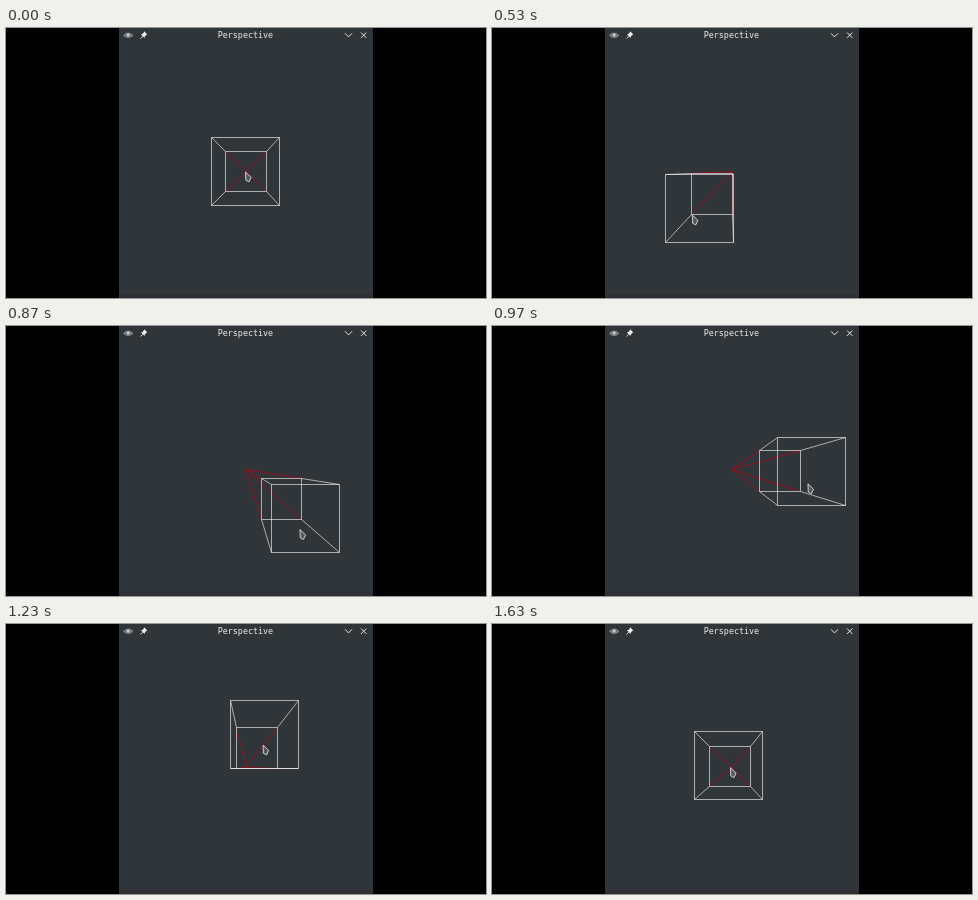
An HTML page that plays this animation: 480 px wide and 270 px high, repeating every 1760 ms.

```html
<!DOCTYPE html>
<html lang="en">
<head>
<meta charset="utf-8">
<title>Perspective</title>
<style>
  html, body { margin: 0; width: 100%; height: 100%; overflow: hidden; background: #000; }
  svg { display: block; width: 100vw; height: 100vh; }
  text { font-family: "DejaVu Sans Mono", "Noto Sans Mono", monospace; font-size: 8.4px; fill: #eceded; }
</style>
</head>
<body>
<svg viewBox="0 0 480 270">
  <rect width="480" height="270" fill="#000"/>
  <rect x="113" width="254" height="270" fill="#303539"/>
  <rect x="113" y="266" width="254" height="4" fill="#302f33"/>

  <g fill="none" stroke="#d8dadb">
    <path d="M117.5 7.4Q122.2 2.6 127 7.4Q122.2 11.6 117.5 7.4Z" fill="#6d7174" stroke="#94989a" stroke-width=".8"/>
    <circle cx="122.2" cy="7" r="1.6" fill="#c9cbcc" stroke="none"/>
    <path d="M134.4 10.6L137 8" stroke-width=".9"/>
    <path d="M138.2 3.3L141.3 6.4L140.2 6.9L138.8 8.4L138.6 10L134.9 6.3L136.4 6L137.8 4.6Z" fill="#eceded" stroke="none"/>
    <path d="M339 5.3L342.5 8.9L346 5.3M355 4.5L360.4 9.9M360.4 4.5L355 9.9" stroke="#e4e5e6"/>
  </g>
  <text x="211.7" y="10">Perspective</text>

  <path id="rays" fill="none" stroke="#c40018" stroke-width=".9" stroke-opacity=".75"/>
  <!-- separate translucent paths, so that crossing edges add up -->
  <g fill="none" stroke="#fff" stroke-opacity=".6">
    <path id="near"/>
    <path id="far"/>
    <path id="sides"/>
  </g>
  <path id="cursor" d="M0 0L.3 8.2L3.4 9.9L5.6 5.4Z" fill="#55595c" stroke="#dcdddd" stroke-width=".9" stroke-linejoin="round"/>
</svg>
<script>
  const LOOP = 1760, STEP = 100 / 3;
  const EYE = [240, 143.5], HALF = 34, DEPTH = 0.6;

  // The box swings round the eye point:
  // step, radius, angle in degrees, pointer offset x and y
  const swing = [
    [8, .3, 200, -.2, .6],
    [16, 49.3, 131.5, -7, 6.6],
    [22, 68.2, 83.7, -7.4, 9],
    [24, 71.5, 66, -6.5, 10],
    [29, 79.8, 1.4, -3.8, 12.4],
    [37, 37.9, -60.6, -1.5, 10.6],
    [40, 2, -80, 1, 4],
    [49, 4.1, -155, 2.2, 2]
  ];

  const $ = id => document.getElementById(id);
  const snap = v => Math.round(v - .5) + .5;

  function slope(i, k) {
    const a = swing[i - 1], b = swing[i + 1];
    return a && b ? (b[k] - a[k]) / (b[0] - a[0]) : 0;
  }

  // Smooth curve through the key points, at rest before and after
  function pose(step) {
    const last = swing.length - 1;
    const n = Math.min(Math.max(step, swing[0][0]), swing[last][0]);
    let i = 0;
    while (i < last - 1 && swing[i + 1][0] <= n) i++;
    const a = swing[i], b = swing[i + 1], d = b[0] - a[0];
    const u = (n - a[0]) / d, v = 1 - u;
    return [1, 2, 3, 4].map(k => a[k] + (b[k] - a[k]) * u * u * (3 - 2 * u)
      + d * u * v * (v * slope(i, k) - u * slope(i + 1, k)));
  }

  function square(dx, dy, scale) {
    const cx = EYE[0] + dx * scale, cy = EYE[1] + dy * scale, r = HALF * scale;
    return [[-r, -r], [r, -r], [r, r], [-r, r]].map(([x, y]) => [snap(cx + x), snap(cy + y)]);
  }

  const line = (a, b) => `M${a}L${b}`;
  const ring = p => `M${p.join("L")}Z`;
  const setPath = (id, d) => $(id).setAttribute("d", d);

  function draw(ms) {
    const step = Math.floor((ms % LOOP + 4) / STEP);
    const [r, angle, gx, gy] = pose(step);
    const dx = r * Math.cos(angle * Math.PI / 180), dy = r * Math.sin(angle * Math.PI / 180);
    const near = square(dx, dy, 1), far = square(dx, dy, DEPTH);
    setPath("rays", far.map(p => line(EYE, p)).join(""));
    setPath("near", ring(near));
    setPath("far", ring(far));
    setPath("sides", near.map((p, i) => line(p, far[i])).join(""));
    $("cursor").setAttribute("transform", `translate(${EYE[0] + dx + gx} ${EYE[1] + dy + gy})`);
  }

  const start = performance.now();
  function tick() {
    draw(performance.now() - start);
    requestAnimationFrame(tick);
  }
  draw(0);
  requestAnimationFrame(tick);
</script>
</body>
</html>
```
